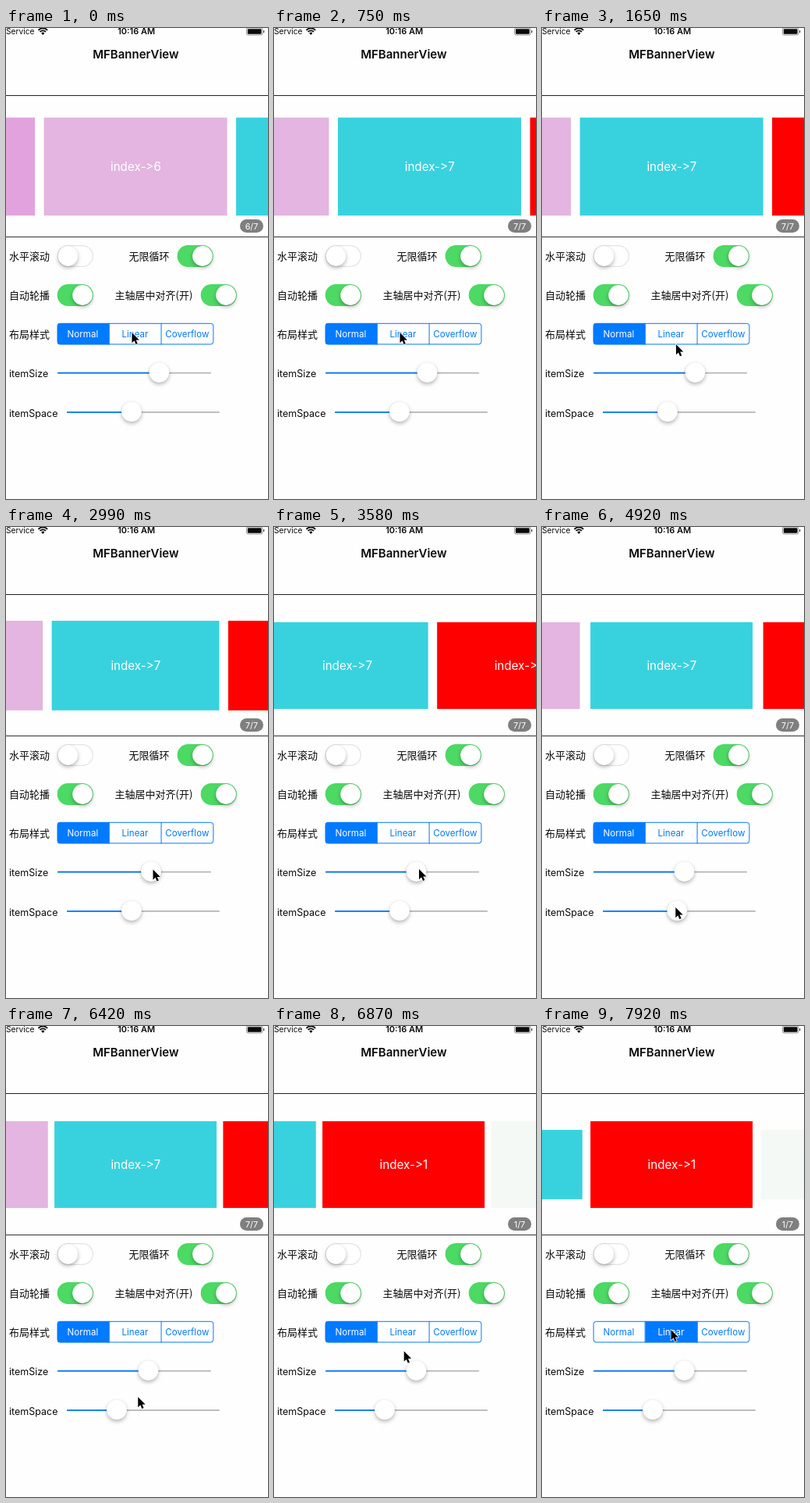
An HTML page with a canvas that plays this animation: 336 by 603 pixels, repeating every 8 s.

```html
<!DOCTYPE html>
<html lang="zh">
<head>
<meta charset="utf-8">
<title>MFBannerView</title>
<style>
html, body { margin: 0; width: 100%; height: 100%; overflow: hidden; background: #fff; }
canvas { display: block; width: 336px; height: 603px; }
</style>
</head>
<body>
<canvas id="stage"></canvas>
<script>
const W = 336, H = 603, LOOP = 8000;
const BEAT = 149.1; // the screen refreshes once per beat
const BLUE = '#007aff', GREEN = '#4cd964', GRAY = '#b5b5b5', INK = '#0a0a0a';
const LATIN = 'Inter, sans-serif';
const CJK = '"Noto Sans CJK SC", "Noto Sans CJK", sans-serif';
const CARD_COLORS = ['#ff0000', '#f4f9f6', '#f3d36b', '#86c98e', '#e2a2de', '#e3b5e0', '#38d2de'];

const canvas = document.getElementById('stage');
const ctx = canvas.getContext('2d');
const dpr = window.devicePixelRatio || 1;
canvas.width = W * dpr;
canvas.height = H * dpr;

const progress = (t, from, to) => Math.max(0, Math.min(1, (t - from) / (to - from)));
const slow = f => 1 - (1 - f) ** 1.25;
const smooth = f => f * f * (3 - 2 * f);
const drag = (t, from, to) => slow(progress(t, from, to));
const scroll = (t, from) => smooth(progress(t, from, from + 2.6));

function stateAt(beat) {
  return {
    size: 196.5 - 14 * drag(beat, 16, 22),
    space: 161 + 15 * drag(beat, 30, 34) - 34 * drag(beat, 34, 40),
    // Autoplay every 20 beats; touching the spacing slider jumps back one card.
    page: 6 + scroll(beat, 3) + scroll(beat, 23) + scroll(beat, 43) - (beat >= 29),
    linear: drag(beat, 50, 53),
    selected: beat >= 51 ? 1 : 0,
    cursor: cursorAt(beat)
  };
}

function cursorAt(beat) {
  const moves = [
    { from: 10, to: 14, x: 196, y: 440 },
    { from: 16, to: 22, x: 186, y: 438 },
    { from: 24, to: 28, x: 161, y: 487 },
    { from: 30, to: 34, x: 173.5, y: 487 },
    { from: 34, to: 40, x: 141, y: 487 },
    { from: 42, to: 43, x: 169.3, y: 475 },
    { from: 43, to: 48, x: 165.5, y: 389 }
  ];
  let x = 161.5, y = 390;
  for (const move of moves) {
    const f = drag(beat, move.from, move.to);
    x += (move.x - x) * f;
    y += (move.y - y) * f;
  }
  return [x, y];
}

function text(str, x, y, size, { color = INK, weight = 400, align = 'left', family = LATIN } = {}) {
  ctx.font = `${weight} ${size}px ${family}`;
  ctx.textAlign = align;
  ctx.fillStyle = color;
  ctx.fillText(str, x, y);
}

function rect(x, y, w, h, color) {
  ctx.fillStyle = color;
  ctx.fillRect(x, y, w, h);
}

function roundPath(x, y, w, h, r) {
  ctx.beginPath();
  ctx.roundRect(x, y, w, h, r);
}

function roundRect(x, y, w, h, r, color) {
  roundPath(x, y, w, h, r);
  ctx.fillStyle = color;
  ctx.fill();
}

function knob(x, y) {
  ctx.save();
  ctx.shadowColor = 'rgba(0,0,0,.28)';
  ctx.shadowBlur = 5 * dpr;
  ctx.shadowOffsetY = 2.4 * dpr;
  ctx.beginPath();
  ctx.arc(x, y, 12.9, 0, Math.PI * 2);
  ctx.fillStyle = '#fff';
  ctx.fill();
  ctx.restore();
  ctx.strokeStyle = 'rgba(0,0,0,.07)';
  ctx.lineWidth = 0.5;
  ctx.stroke();
}

function toggle(x, y, on) {
  roundRect(x, y, 46.2, 28, 14, on ? GREEN : '#e3e3e3');
  if (!on) roundRect(x + 1.2, y + 1.2, 43.8, 25.6, 12.8, '#fff');
  knob(on ? x + 32.4 : x + 13.8, y + 14);
}

function slider(x, y, w, pos) {
  roundRect(x, y - 0.9, w, 1.8, 0.9, GRAY);
  roundRect(x, y - 0.9, pos - x, 1.8, 0.9, BLUE);
  knob(pos, y - 0.7);
}

function statusBar() {
  text('Service', 0, 8, 10.2);
  text('10:16 AM', 167.2, 8, 11, { weight: 600, align: 'center' });
  ctx.strokeStyle = INK;
  ctx.lineWidth = 1.8;
  for (const r of [8.2, 5.3]) {
    ctx.beginPath();
    ctx.arc(47.3, 8.6, r, -Math.PI * 0.75, -Math.PI * 0.25);
    ctx.stroke();
  }
  ctx.beginPath();
  ctx.moveTo(47.3, 9);
  ctx.arc(47.3, 8.6, 3, -Math.PI * 0.75, -Math.PI * 0.25);
  ctx.fillStyle = INK;
  ctx.fill();
  roundPath(308.4, 0, 20.6, 9, 2.2);
  ctx.lineWidth = 0.8;
  ctx.strokeStyle = '#777';
  ctx.stroke();
  roundRect(309.8, 1.3, 17.8, 6.4, 1.2, INK);
  roundRect(330, 3, 1.3, 3.2, 0.6, '#555');
}

// Drawn in two pieces so that the font does not join "->" into an arrow.
function cardTitle(number, x, y) {
  const size = 15.2, head = 'index-', tail = '>' + number;
  ctx.font = `400 ${size}px ${LATIN}`;
  const split = x + (ctx.measureText(head).width - ctx.measureText(tail).width) / 2;
  text(head, split, y, size, { color: '#fff', align: 'right' });
  text(tail, split, y, size, { color: '#fff' });
}

function banner({ page, size, space, linear }) {
  const center = 166.1, mid = 177.4;
  const width = 235 - (196.5 - size) * 1.93;
  const gap = (space - 92) / 6;
  const nearest = Math.round(page);
  for (let i = nearest - 2; i <= nearest + 2; i++) {
    const offset = i - page;
    const side = Math.max(-1, Math.min(1, offset)) * linear;
    const height = width * 0.534 * (1 - 0.2 * Math.abs(side));
    const x = center + offset * (width + gap) + side * 2;
    const index = (i + 6) % 7;
    rect(x - width / 2, mid - height / 2, width, height, CARD_COLORS[index]);
    cardTitle(index + 1, x + 0.3, 183);
  }
  roundRect(300, 245, 30, 17, 8.5, '#7f7f7f');
  text(`${(nearest + 6) % 7 + 1}/7`, 315, 257.6, 10.8, { color: '#fff', align: 'center' });
}

function segments(selected) {
  const x = 65.6, y = 377.8, w = 200.8, h = 27.6, part = w / 3;
  ctx.save();
  roundPath(x, y, w, h, 3.6);
  ctx.clip();
  rect(x + part * selected, y, part, h, BLUE);
  ctx.restore();
  roundPath(x + 0.5, y + 0.5, w - 1, h - 1, 3.4);
  ctx.strokeStyle = BLUE;
  ctx.lineWidth = 1;
  ctx.stroke();
  ['Normal', 'Linear', 'Coverflow'].forEach((label, i) => {
    if (i) rect(x + part * i - 0.9, y, 1, h, BLUE);
    const color = i === selected ? '#fff' : BLUE;
    text(label, x + part * (i + 0.5) - 0.6, 395.8, 11.6, { color, align: 'center' });
  });
}

function pointer([x, y]) {
  ctx.save();
  ctx.translate(x, y);
  ctx.scale(0.94, 0.94);
  ctx.beginPath();
  [[0, 0], [0, 14], [3.2, 11], [5.4, 16], [7.8, 15], [5.6, 10.1], [10, 10.1]]
    .forEach(([px, py]) => ctx.lineTo(px, py));
  ctx.closePath();
  ctx.lineJoin = 'round';
  ctx.lineWidth = 1.6;
  ctx.strokeStyle = '#fff';
  ctx.stroke();
  ctx.fillStyle = '#000';
  ctx.fill();
  ctx.restore();
}

function controls({ size, space, selected }) {
  const label = (str, x, y) => text(str, x, y, 13, { family: CJK });
  label('水平滚动', 4, 297);
  toggle(65.7, 278, false);
  label('无限循环', 157.5, 297);
  toggle(219.6, 278, true);
  label('自动轮播', 4, 347);
  toggle(65.7, 328, true);
  label('主轴居中对齐(开)', 139.5, 347);
  toggle(249.7, 328, true);
  label('布局样式', 4, 397);
  segments(selected);
  text('itemSize', 4, 447.3, 12.5);
  slider(66, 441.7, 197, size);
  text('itemSpace', 4, 497.5, 12.5);
  slider(78, 491.9, 196, space);
}

function draw(ms) {
  const state = stateAt(Math.floor(ms / BEAT));
  ctx.setTransform(dpr, 0, 0, dpr, 0, 0);
  rect(0, 0, W, H, '#fefefe');
  statusBar();
  text('MFBannerView', 166.4, 39, 15, { weight: 600, align: 'center' });
  rect(0, 86, W, 1, '#222');
  rect(0, 267, W, 1, '#333');
  banner(state);
  controls(state);
  pointer(state.cursor);
}

const start = performance.now();
function tick() {
  draw((performance.now() - start) % LOOP);
  requestAnimationFrame(tick);
}
tick();
</script>
</body>
</html>
```
